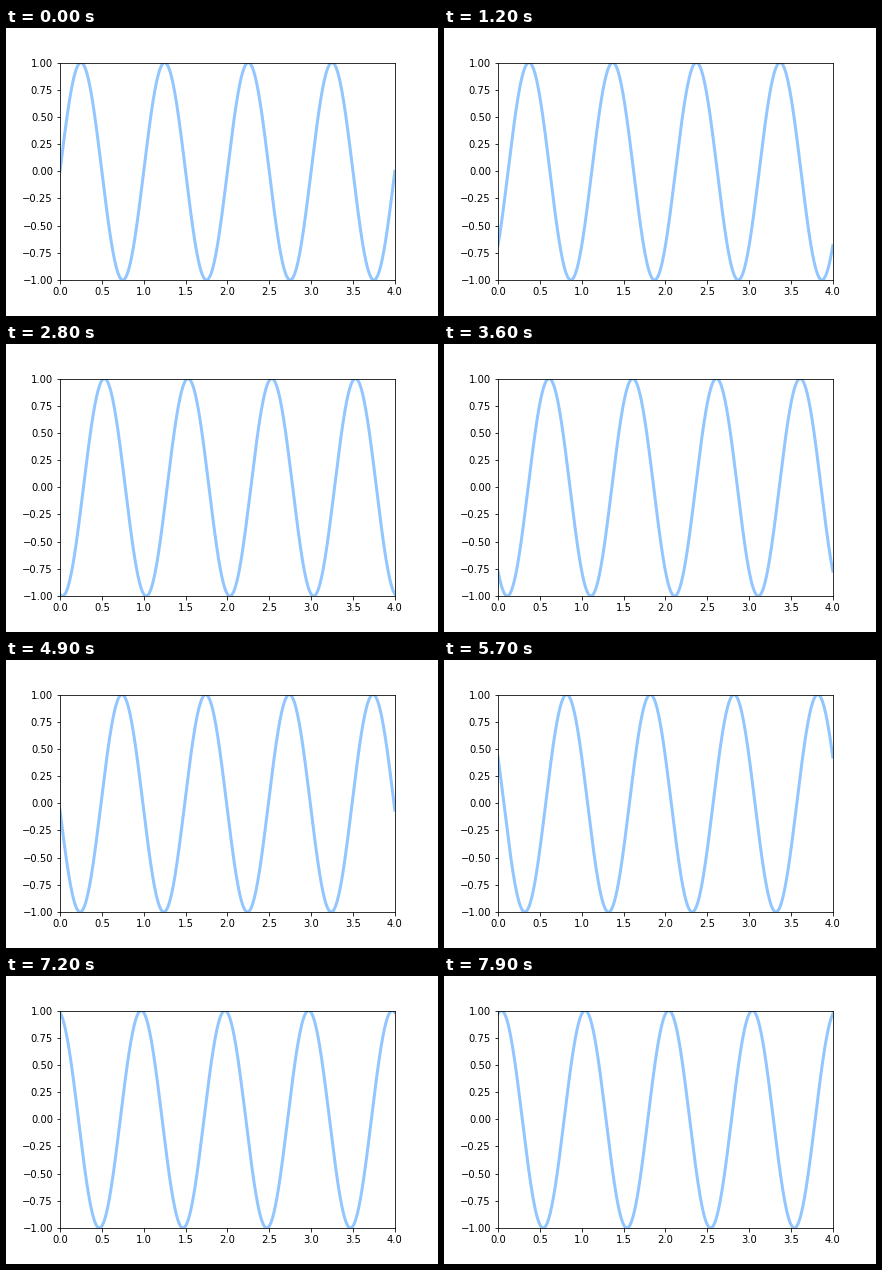
These frames come from a looping animation (432x288 px, 8 s). A matplotlib script:

```python
import matplotlib.pyplot as plt
import numpy as np
from matplotlib.animation import FuncAnimation

FRAMES = 80
INTERVAL = 100  # ms
SHIFT = 0.01    # distance travelled per frame

fig = plt.figure(figsize=(6, 4), dpi=72, facecolor="white")
fig.subplots_adjust(bottom=0.125)
ax = fig.add_subplot(xlim=(0, 4), ylim=(-1, 1))
line, = ax.plot([], [], lw=3, color="#92C6FF")
x = np.linspace(0, 4, 1000)


def update(i):
    line.set_data(x, np.sin(2 * np.pi * (x - SHIFT * i)))
    return line,


anim = FuncAnimation(fig, update, frames=FRAMES, interval=INTERVAL,
                     repeat=True, repeat_delay=0, blit=False)
plt.show()
```
